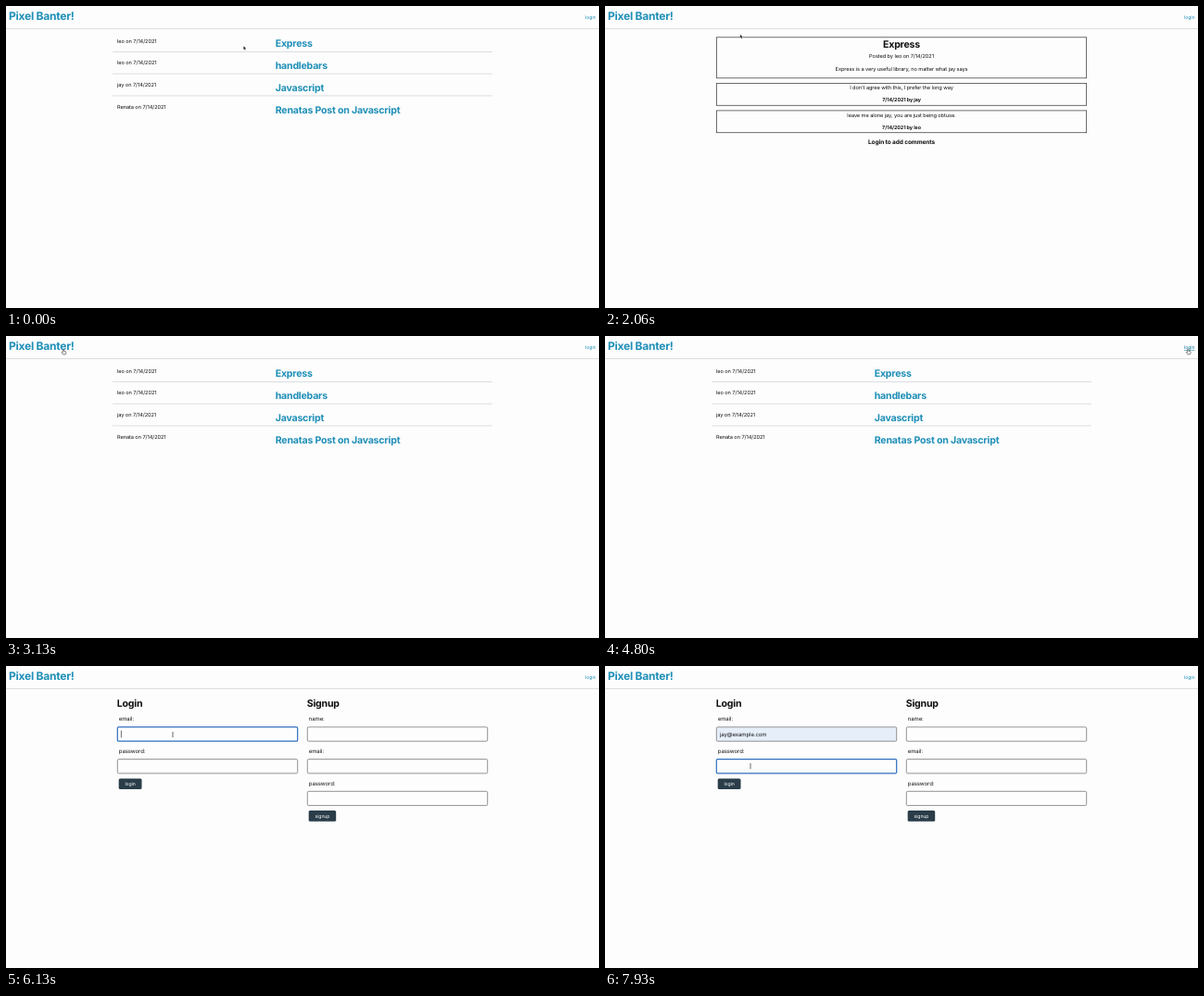
These frames come from a looping animation (640x326 px, 8000 ms). An HTML page:

```html
<!DOCTYPE html>
<html lang="en">
<head>
<meta charset="utf-8">
<title>Blog walkthrough</title>
<style>
  html, body { margin: 0; width: 100%; height: 100%; overflow: hidden; background: #fdfdfd; }
  svg { display: block; width: 100%; height: 100%; }
  text { font: 5.65px Inter, "Open Sans", sans-serif; letter-spacing: -.015em; text-rendering: geometricPrecision; fill: #111; }
  .mid { text-anchor: middle; }
  .b { font-weight: 700; }
  .h1 { font-size: 12px; font-weight: 700; letter-spacing: -.02em; }
  .h2 { font-size: 10.6px; font-weight: 700; letter-spacing: -.02em; }
  .h4 { font-size: 6.5px; font-weight: 700; }
  .date { font-size: 5.4px; }
  .label { font-size: 6px; }
  .small { font-size: 5.15px; }
  .link { fill: #1f8fb7; }
  .link.hover { fill: #08769b; text-decoration: underline; }
  .rule { stroke: #d9dbdd; stroke-width: .9; }
  .box { fill: none; stroke: #4a4a4a; stroke-width: .8; }
  .field { fill: #fdfdfd; stroke: #777; stroke-width: .8; }
  .field.filled { fill: #e6eff9; }
  .field.focus { stroke: #2f6fbe; stroke-width: 1.2; }
  .button rect { fill: #dedede; }
  .dark .button rect { fill: #2a3d49; }
  .dark .button text { fill: #fff; }
</style>
</head>
<body>
<svg id="stage" viewBox="0 0 640 326"></svg>
<script>
const LOOP = 8000, STEP = 1000 / 15;
const stage = document.getElementById('stage');

const text = (x, y, str, cls = '', id = '') =>
  `<text x="${x}" y="${y}" class="${cls}" id="${id}">${str}</text>`;
const rule = (x1, x2, y) => `<line class="rule" x1="${x1}" x2="${x2}" y1="${y}" y2="${y}"/>`;
const rect = (x, y, w, h, cls, r = 0, id = '') =>
  `<rect x="${x}" y="${y}" width="${w}" height="${h}" rx="${r}" class="${cls}" id="${id}"/>`;
const field = (x, y, label, id) =>
  text(x + 1.8, y - 6.5, label, 'label') + rect(x + .3, y, 194.4, 15.3, 'field', 1.3, id);
const button = (x, y, w, label) =>
  `<g class="button">${rect(x, y, w, 11.7, '', 1.5)}${text(x + w / 2, y + 7.8, label, 'small mid')}</g>`;

const posts = [
  ['leo', 'Express'], ['leo', 'handlebars'],
  ['jay', 'Javascript'], ['Renata', 'Renatas Post on Javascript']
];
const listPage = posts.map(([who, title], i) => {
  const y = i * 23.7;
  return text(120, 39.7 + y, `${who} on 7/14/2021`) +
    text(290.7, 44.4 + y, title, 'h2 link', 'post' + i) +
    (i < 3 ? rule(115, 525, 49.5 + y) : '');
}).join('');

const comment = (y, str, who) =>
  rect(120.4, y, 399.2, 23.8, 'box') + text(320, y + 6.7, str, 'mid') +
  text(320, y + 19.6, `7/14/2021 by ${who}`, 'date b mid');
const postPage =
  rect(120.4, 33.8, 399.2, 44, 'box') +
  text(320, 44.6, 'Express', 'h2 mid') +
  text(320, 56.1, 'Posted by leo on 7/14/2021', 'mid') +
  text(320, 70.1, 'Express is a very useful library, no matter what jay says', 'mid') +
  comment(83.5, "I don't agree with this, I prefer the long way", 'jay') +
  comment(112.9, 'leave me alone jay, you are just being obtuse.', 'leo') +
  text(320, 148.9, 'Login to add comments', 'h4 mid');

const loginPage =
  text(119.7, 44.4, 'Login', 'h2') + text(324.7, 44.4, 'Signup', 'h2') +
  field(120, 65.9, 'email:', 'email') + field(120, 100.6, 'password:', 'password') +
  field(325, 65.9, 'name:') + field(325, 100.6, 'email:') + field(325, 135.3, 'password:') +
  button(121.7, 121.4, 24.8, 'login') + button(326.7, 156.1, 29.5, 'signup') +
  text(124, 75.7, 'jay@example.com', '', 'address') +
  '<path id="caret" stroke="#111" stroke-width=".6"/>';

stage.innerHTML =
  text(3, 15.2, 'Pixel Banter!', 'h1 link', 'brand') +
  text(636.5, 14.3, 'login', 'small link', 'login') + rule(0, 640, 24.5) +
  `<g id="list">${listPage}</g><g id="post">${postPage}</g><g id="account">${loginPage}</g>` +
  `<g id="cursor">
    <path id="arrow" d="M0 0V4.3L1 3.4L1.7 5L2.5 4.6L1.8 3.1H3Z" fill="#000" stroke="#fff" stroke-width=".4"/>
    <path id="hand" d="M-.6 2.8V.4Q0-.4.6.4V2L2.4 2.4Q3 2.7 2.8 3.8L2.2 5.6H-.4L-1.9 3.4Q-1.6 2.4-.6 3.2Z" fill="#fff" stroke="#333" stroke-width=".6"/>
    <path id="beam" d="M-.9-2.6Q0-2.6 0-2V2Q0 2.6-.9 2.6M.9-2.6Q0-2.6 0-2V2Q0 2.6.9 2.6" fill="none" stroke="#555" stroke-width=".5"/>
  </g>`;
stage.querySelector('#login').style.textAnchor = 'end';

const $ = id => stage.querySelector('#' + id);
const show = (id, on) => $(id).setAttribute('visibility', on ? 'inherit' : 'hidden');
const toggle = (id, cls, on) => $(id).classList.toggle(cls, on);

// Pointer stops: time, x, y
const path = [
  [0, 256.3, 43], [867, 310, 42], [1200, 310, 42], [1733, 272, 45],
  [2067, 145.7, 30.5], [2533, 64, 14], [2733, 63, 14], [2933, 62, 14.3],
  [3267, 62, 14.3], [3733, 330, 78], [4133, 619, 30], [4800, 629.3, 14.2],
  [5000, 629.3, 14.2], [5400, 388.3, 42.8], [5533, 340, 57], [5933, 185, 74],
  [6333, 175, 74], [6600, 175, 74], [6667, 173, 84.5], [7070, 173, 84.5],
  [7467, 160, 104], [7667, 157, 108], [LOOP, 157, 108]
];
function pointer(t) {
  const i = path.findIndex(p => p[0] > t);
  const [t0, x0, y0] = path[i - 1], [t1, x1, y1] = path[i];
  const k = (t - t0) / (t1 - t0);
  return [x0 + (x1 - x0) * k, y0 + (y1 - y0) * k];
}

function draw(t) {
  const within = (a, b) => t >= a && t < b;
  const [x, y] = pointer(t);

  const onPost = within(1200, 3130), onAccount = t >= 5200;
  show('list', !onPost && !onAccount);
  show('post', onPost);
  show('account', onAccount);

  const overPost = t < 1200 && x > 291;
  const overBrand = within(2067, 3600) && x < 75 && y < 20;
  const overLogin = within(4400, 5060) && x > 624 && y < 18;
  toggle('post0', 'hover', overPost);
  toggle('brand', 'hover', overBrand && t < 3130);
  toggle('login', 'hover', overLogin);

  const inEmail = within(6130, 7660), inPassword = t >= 7660;
  const filled = t >= 6660, chosen = t >= 7130;
  toggle('account', 'dark', t >= 5600);
  toggle('email', 'focus', inEmail);
  toggle('email', 'filled', filled);
  toggle('password', 'focus', inPassword);
  show('address', onAccount && filled);
  $('address').style.fontSize = chosen ? '6px' : '4.3px';
  $('address').style.fontWeight = chosen ? 400 : 500;
  show('caret', within(6130, 6660) || within(7660, 7930));
  $('caret').setAttribute('d', `M124.4 ${inPassword ? 104.3 : 69.6}v7.8`);

  const hand = overPost || overBrand || overLogin;
  const beam = within(5860, 6660) || t >= 7400;
  show('hand', hand);
  show('beam', beam);
  show('arrow', !hand && !beam);
  $('cursor').setAttribute('transform', `translate(${x} ${y})`);
}

const start = performance.now();
function tick() {
  const t = (performance.now() - start) % LOOP;
  draw(Math.floor((t + 7) / STEP) % 120 * STEP);
  requestAnimationFrame(tick);
}
tick();
</script>
</body>
</html>
```
